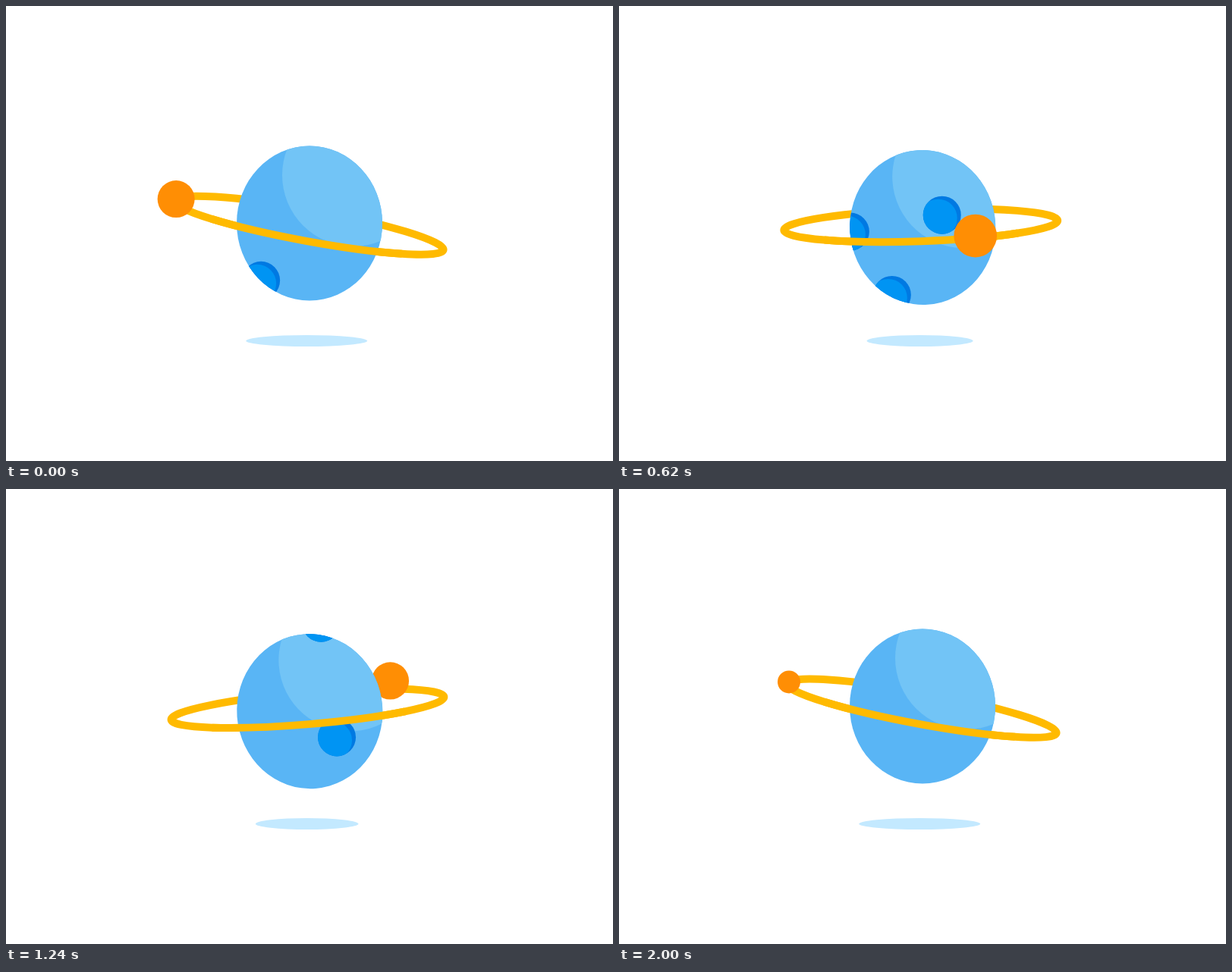
Recreate the animation shown at these times as an HTML page with a canvas. Size 800 by 600 pixels, loop 2020 ms.

```html
<!DOCTYPE html>
<html lang="en">
<head>
<meta charset="utf-8">
<title>Planet</title>
<style>
html, body { margin: 0; width: 100%; height: 100%; overflow: hidden; background: #fff; }
canvas { display: block; }
</style>
</head>
<body>
<canvas id="stage" width="800" height="600"></canvas>
<script>
const ctx = document.getElementById('stage').getContext('2d');
const LOOP = 2020, HALF = 1000, END = 2000, TURN = 990;
const rad = deg => deg * Math.PI / 180;

function ellipse(x, y, rx, ry, color) {
  ctx.beginPath();
  ctx.ellipse(x, y, rx, ry, 0, 0, 2 * Math.PI);
  ctx.fillStyle = color;
  ctx.fill();
}
const circle = (x, y, r, color) => ellipse(x, y, r, r, color);

const bezier = (s, a, b, c, d) => {
  const q = 1 - s;
  return q * q * q * a + 3 * q * q * s * b + 3 * q * s * s * c + s * s * s * d;
};

// Position and size of the moon: in front until TURN, then behind
function moonAt(t) {
  if (t < TURN) {
    const s = t / TURN;
    return [bezier(s, 224, 278, 558, 567), bezier(s, 254.4, 322, 316, 270), 24.5 + 0.0062 * t];
  }
  const s = (t - TURN) / (END - TURN);
  return [bezier(s, 567, 562, 185, 224), bezier(s, 270, 238, 246, 254.4), 15 + 15 * (1 - s) ** 1.55];
}

function spotsAt(t) {
  const d = t - 1060;
  return [
    [336 + 0.1445 * t, 362 - 0.139 * t],
    [383 + 0.178 * d, 212 - 0.195 * d],
    [413 + 0.1255 * d + 1e-5 * d * d, 340 - 0.0765 * d + 3.8e-5 * d * d]
  ];
}

function drawRing(p, from, to) {
  ctx.beginPath();
  ctx.ellipse(399 - 2 * p, 289.2, 180.5, 21, rad(10.4 - 20 * p), from, to);
  ctx.strokeStyle = '#ffba00';
  ctx.lineWidth = 10;
  ctx.stroke();
}

function drawSpot([x, y]) {
  ctx.save();
  circle(x, y, 25, '#0079e2');
  ctx.clip();
  circle(x - 5, y + 4, 25, '#0094f3');
  ctx.restore();
}

function drawPlanet(t, p) {
  ctx.save();
  ctx.translate(400 + 0.4 * p, 286.5 + 8.8 * p);
  ctx.rotate(rad(-5.7 * p));
  ellipse(0, 0, 96, 102, '#59b5f5');
  ctx.clip();
  circle(58, -63.5, 94, '#72c4f6');
  ctx.setTransform(1, 0, 0, 1, 0, 0);
  spotsAt(t).forEach(drawSpot);
  ctx.restore();
}

function draw(now) {
  const t = Math.min(now % LOOP, END);
  const p = 1 - Math.abs(t - HALF) / HALF;
  const drawMoon = () => circle(...moonAt(t), '#ff8e04');

  ctx.clearRect(0, 0, 800, 600);
  ellipse(396.2 + 0.6 * p, 441.5, 80 - 16 * p, 7.5, '#c3e9ff');
  drawRing(p, 0, 2 * Math.PI);
  if (t >= TURN) drawMoon();
  drawPlanet(t, p);
  drawRing(p, rad(45), rad(135));
  if (t < TURN) drawMoon();
  requestAnimationFrame(draw);
}
draw(0);
</script>
</body>
</html>
```
